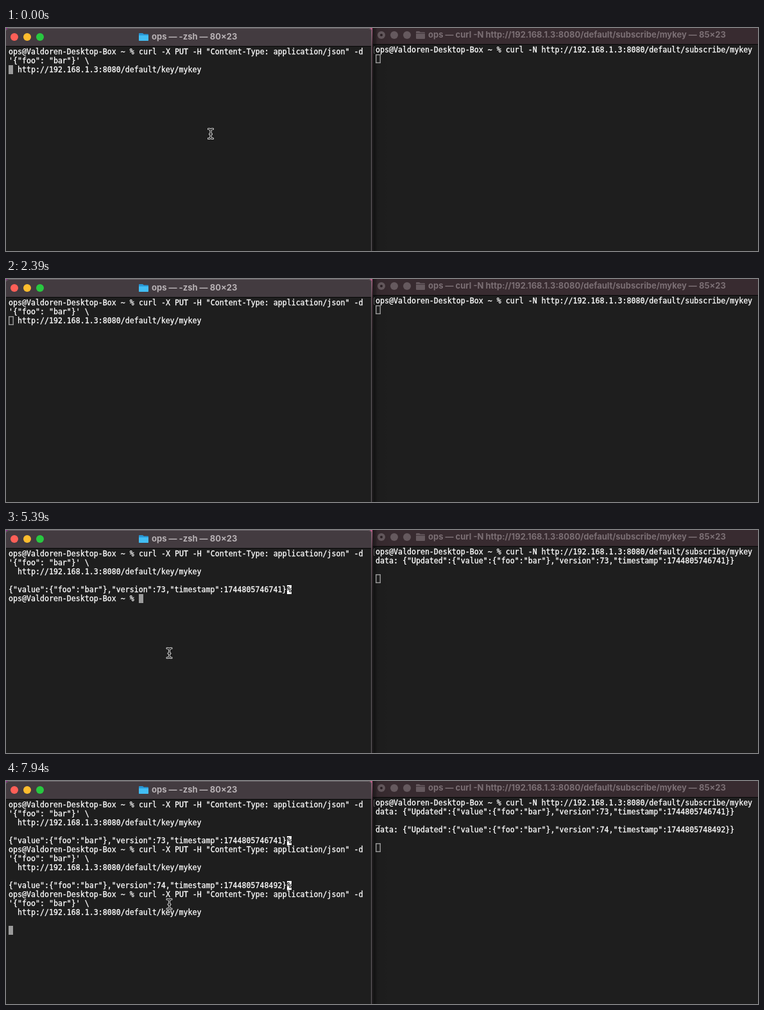
An HTML page that plays this animation: 1172 by 348 pixels, repeating every 8000 ms.

```html
<!DOCTYPE html>
<html lang="en">
<head>
<meta charset="utf-8">
<style>
html, body { margin: 0; width: 100%; height: 100%; overflow: hidden; background: #1e1e1e; }
svg { display: block; }
text { white-space: pre; }
.mono { font: 11.627px "DejaVu Sans Mono", "Noto Sans Mono", monospace; fill: #fff; stroke: #fff; stroke-width: .3px; }
.mono.dark { fill: #111; stroke: #111; }
.title { font: 700 13px Inter, "Liberation Sans", sans-serif; fill: #7b6f74; }
.dim { fill: #65595e; }
.hollow { fill: none; stroke: #959595; stroke-width: 1.5; }
#bar { fill: #433b40; }
#edge { stroke: #6c666a; }
#name { fill: #b8b2b5; }
.off #bar { fill: #382c32; }
.off #edge { stroke: #55494f; }
.off #name { fill: #7b6f74; }
.off #lights circle, .off #folder path { fill: #65595e; }
.off #shade { opacity: .15; }
</style>
</head>
<body>
<svg id="stage" width="1172" height="348">
  <defs>
    <linearGradient id="fade">
      <stop offset="0" stop-opacity=".5"/><stop offset=".2" stop-opacity=".28"/>
      <stop offset=".3" stop-opacity=".06"/><stop offset="1" stop-opacity="0"/>
    </linearGradient>
    <linearGradient id="desk" x2="0" y2="1">
      <stop offset="0" stop-color="#c4608f"/><stop offset=".08" stop-color="#4a2636"/>
      <stop offset=".3" stop-color="#141214"/>
    </linearGradient>
    <filter id="soft" x="-10%" y="-100%" width="120%" height="300%"><feGaussianBlur stdDeviation="2"/></filter>
    <path id="stem" d="M-3.500 -7.500Q0 -7.500 0 -5V5Q0 7.500 -3.500 7.500M3.500 -7.500Q0 -7.500 0 -5M0 5Q0 7.500 3.500 7.500M-1.500 .5H1.500"/>
  </defs>

  <rect width="1172" height="348" fill="#1e1e1e"/>
  <rect x="571" width="601" height="25" fill="#382b30"/>
  <rect x="571" y="25" width="601" height="1" fill="#080808"/>
  <path d="M571.500 0V348" stroke="#4a4548"/>
  <circle class="dim" cx="585" cy="11" r="6"/>
  <circle cx="585" cy="11" r="2" fill="#2b2024"/>
  <circle class="dim" cx="605" cy="11" r="6"/>
  <circle class="dim" cx="625" cy="11" r="6"/>
  <path class="dim" d="M639 6q0-1 1-1h4l2 1.500h6q1 0 1 1V16q0 1-1 1H640q-1 0-1-1z"/>
  <path d="M639 8.500h14" stroke="#43373c"/>
  <text class="title" x="658" y="15">ops — curl -N http://192.168.1.3:8080/default/subscribe/mykey — 85×23</text>
  <path d="M575 29.500H573.500V39.500H575" fill="none" stroke="#8a8a8a"/>

  <rect id="shade" x="570" width="30" height="348" fill="url(#fade)"/>
  <rect x="566" width="5" height="348" fill="url(#desk)"/>
  <rect width="6" height="6" fill="#9c1d99"/>
  <path d="M0 348V4Q1 0 5 0H564Q570 0 570 6V348z" fill="#1e1e1e"/>
  <path id="bar" d="M0 28V4Q1 0 5 0H564Q570 0 570 6V28z"/>
  <path id="notch" d="M106 -4H366Q352 5 330 5H142Q120 5 106 -4z" fill="#241a20" filter="url(#soft)"/>
  <path id="edge" d="M0 4Q1 .5 5 .5H564Q569.500 .5 569.500 6V348" fill="none"/>
  <rect y="28" width="569" height="1" fill="#080808"/>
  <g id="lights">
    <circle cx="13" cy="14" r="6" fill="#fe5f57"/>
    <circle cx="33" cy="14" r="6" fill="#febc2e"/>
    <circle cx="53" cy="14" r="6" fill="#28c840"/>
  </g>
  <g id="folder">
    <path d="M207 9q0-1 1-1h5l2 1.500h6q1 0 1 1V19q0 1-1 1H208q-1 0-1-1z" fill="#2795d3"/>
    <path d="M207 11.500h15V19q0 1-1 1H208q-1 0-1-1z" fill="#42bdf3"/>
  </g>
  <text id="name" class="title" x="227" y="18">ops — -zsh — 80×23</text>

  <g id="lines"></g>
  <rect id="block" width="7" height="14" fill="#9b9b9b"/>
  <rect id="frame" class="hollow" width="6.500" height="12.500"/>
  <rect id="wait" class="hollow" x="576.750" width="6.500" height="12.500"/>
  <g id="beam" fill="none" stroke-linecap="round">
    <use href="#stem" stroke="#fff" stroke-width="3"/>
    <use href="#stem" stroke="#111" stroke-width="1.300"/>
  </g>
</svg>
<script>
const LOOP = 8000, CELL = 7, ROW = 14;
const $ = id => document.getElementById(id);
const items = [];

function add(tag, attrs, from, content = '') {
  const el = document.createElementNS('http://www.w3.org/2000/svg', tag);
  for (const key in attrs) el.setAttribute(key, attrs[key]);
  el.textContent = content;
  $('lines').append(el);
  items.push({ el, from });
}

const left = (row, text, from, col = 0, style = 'mono') =>
  add('text', { class: style, x: 4 + col * CELL, y: 41 + row * ROW }, from, text);
const right = (row, text, from) =>
  add('text', { class: 'mono', x: 576, y: 38 + row * ROW }, from, text);

const prompt = 'ops@Valdoren-Desktop-Box ~ % ';
const url = 'http://192.168.1.3:8080/default/';

function command(row, from) {
  left(row, 'curl -X PUT -H "Content-Type: application/json" -d', from, prompt.length);
  left(row + 1, `'{"foo": "bar"}' \\`, from);
  left(row + 2, `  ${url}key/mykey`, from);
}

function reply(row, rightRow, version, stamp, from) {
  const json = `{"value":{"foo":"bar"},"version":${version},"timestamp":${stamp}}`;
  left(row, json, from);
  add('rect', { x: 4 + json.length * CELL, y: 30 + row * ROW, width: CELL, height: ROW, fill: '#fff' }, from);
  left(row, '%', from, json.length, 'mono dark');
  left(row + 1, prompt, from);
  right(rightRow, `data: {"Updated":${json}}`, from);
}

left(0, prompt, 0);
right(0, `${prompt}curl -N ${url}subscribe/mykey`, 0);
command(0, 0);
reply(4, 1, 73, '1744805746741', 5390);
command(5, 6740);
reply(9, 3, 74, '1744805748492', 7190);
add('rect', { x: 576, y: 69, width: 8, height: 1, fill: '#8a8a8a' }, 7190);
command(10, 7640);

// [start, row, column] of the left text cursor
const cursor = [[0, 2, 0], [5390, 5, 29], [6740, 8, 0], [7040, 9, 0], [7190, 10, 29], [7640, 13, 0], [7940, 14, 0]];
// [start, x, y] of the mouse pointer
const pointer = [[0, 319, 165], [150, -50, 0], [2990, 247.5, 143], [3140, 254.5, 192]];

const at = (steps, t) => steps.findLast(s => s[0] <= t);
const show = (el, on) => { el.style.display = on ? '' : 'none'; };
const within = (t, a, b) => t >= a && t < b;

function place(el, x, y) {
  el.setAttribute('x', x);
  el.setAttribute('y', y);
}

function draw(now) {
  const t = now % LOOP;
  for (const { el, from } of items) show(el, t >= from);

  $('stage').classList.toggle('off', within(t, 150, 2390));
  show($('notch'), within(t, 450, 2390));

  const [, row, col] = at(cursor, t);
  const x = 4 + col * CELL, y = 30 + row * ROW;
  const hollow = within(t, 300, 2540);
  place($('block'), x, y);
  place($('frame'), x + .75, y + .75);
  show($('block'), !hollow);
  show($('frame'), hollow);

  const waitRow = t < 5390 ? 1 : t < 7190 ? 3 : 5;
  $('wait').setAttribute('y', 27.75 + waitRow * ROW);

  const [, px, py] = at(pointer, t);
  $('beam').setAttribute('transform', `translate(${px} ${py})`);
}

const start = performance.now();
function tick() {
  draw(performance.now() - start);
  requestAnimationFrame(tick);
}
tick();
</script>
</body>
</html>
```
